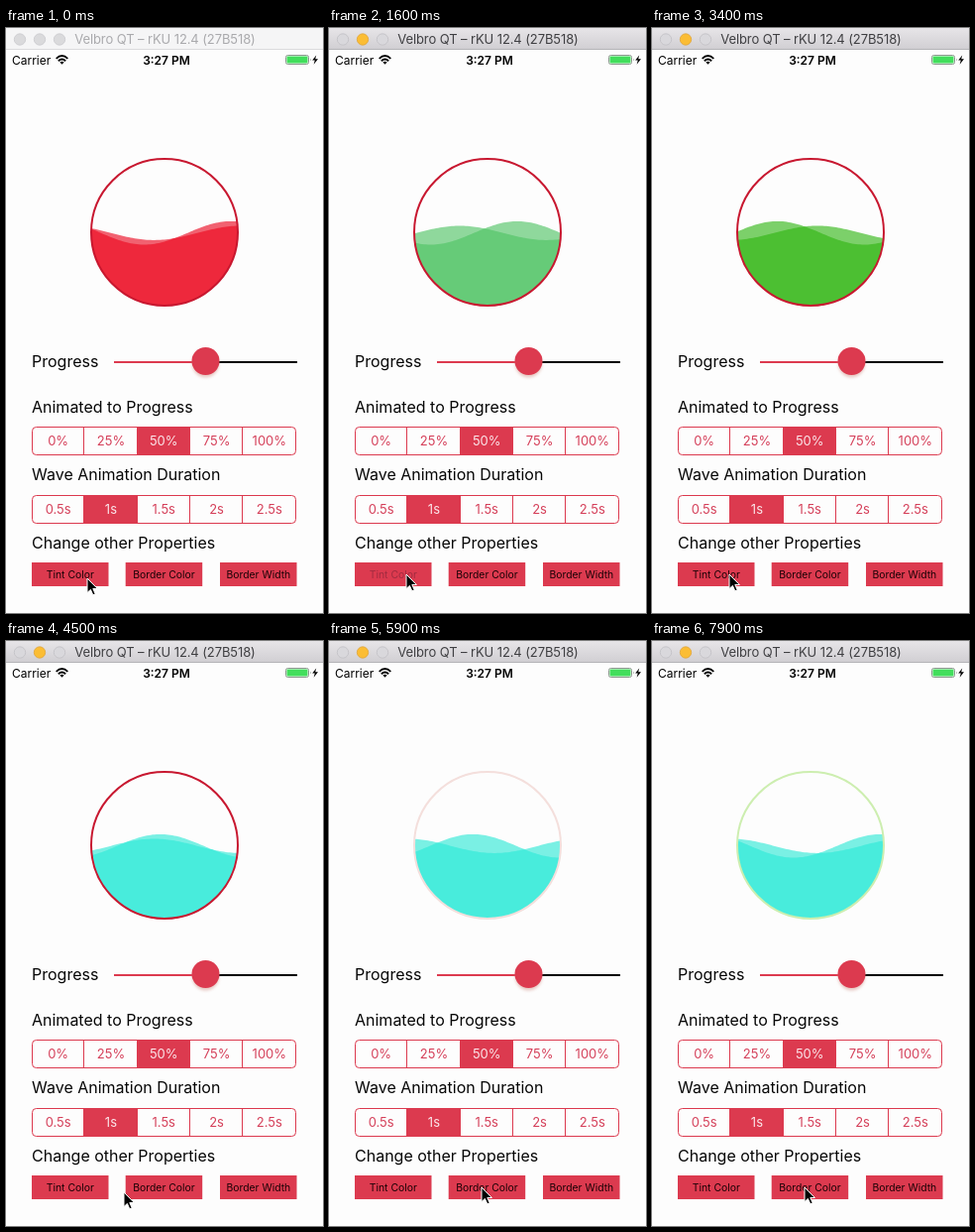
An HTML page that plays this animation: 320x590 px, repeating every 8 s.

```html
<!DOCTYPE html>
<html lang="en">
<head>
<meta charset="utf-8">
<title>Wave progress</title>
<style>
  html, body { margin: 0; width: 100%; height: 100%; overflow: hidden; background: #fdfdfd; }
  svg { display: block; width: 320px; height: 590px; font-family: Inter, Roboto, sans-serif; }
  .mid { text-anchor: middle; }
  .label { font-size: 16px; fill: #060606; }
  .seg { font-size: 13px; fill: #d5405a; }
  .seg.on { fill: #fbe6ea; }
  .btn { font-size: 10.4px; fill: #1c0206; }
  .btn.down { fill: #a22c40; }
  .red { fill: #dc3a4f; }
  .line { fill: none; stroke: #dc3a4f; }
  #title { font-size: 13px; letter-spacing: -.1px; fill: #3f3f42; }
  #bar { fill: url(#chrome); }
  #barEdge { fill: #b4b3b7; }
  .light { fill: #d9d8dc; stroke: #c0bfc4; stroke-width: .8; }
  .light.amber { fill: #fbbd34; stroke: #dfa43a; }
  .idle #bar { fill: #f5f5f6; }
  .idle #barEdge { fill: #dadadc; }
  .idle #title { fill: #aaaaad; }
  .idle .light { fill: #dadadc; stroke: #cacacd; }
</style>
</head>
<body>
<svg id="stage" class="idle" viewBox="0 0 320 590">
  <defs>
    <linearGradient id="chrome" x1="0" y1="0" x2="0" y2="1">
      <stop offset="0" stop-color="#e7e5e8"/>
      <stop offset="1" stop-color="#d0ced2"/>
    </linearGradient>
    <clipPath id="bowl"><circle cx="160" cy="206" r="74"/></clipPath>
    <filter id="soft" x="-50%" y="-50%" width="200%" height="200%">
      <feGaussianBlur stdDeviation="1.8"/>
    </filter>
  </defs>

  <rect width="320" height="590" fill="#fdfdfd"/>
  <rect id="bar" width="320" height="22"/>
  <rect id="barEdge" y="21" width="320" height="1"/>
  <circle class="light" cx="14" cy="11.5" r="5.7"/>
  <circle class="light amber" cx="34" cy="11.5" r="5.7"/>
  <circle class="light" cx="54" cy="11.5" r="5.7"/>
  <text id="title" class="mid" x="160.5" y="16">Velbro QT – rKU 12.4 (27B518)</text>

  <text x="6" y="36.5" font-size="12">Carrier</text>
  <g fill="none" stroke="#000" stroke-width="1.9">
    <path d="M50.7 30.9Q56.5 25.3 62.3 30.9M52.9 33.2Q56.5 29.8 60.1 33.2"/>
    <path d="M54.4 34.6Q56.5 32.8 58.6 34.6L56.5 36.8Z" fill="#000" stroke="none"/>
  </g>
  <text class="mid" x="162" y="36.5" font-size="12" font-weight="600">3:27 PM</text>
  <rect x="282.5" y="27.5" width="23" height="9" rx="2" fill="none" stroke="#8c988e"/>
  <rect x="283.5" y="28.5" width="21" height="7" rx="1" fill="#42de5c"/>
  <path d="M307 30.5q1.6 1.5 0 3z" fill="#8c988e"/>
  <path d="M313.2 27.5l-4 5h2.6l-1.2 4.2 4.4-5.4h-2.8z"/>

  <g clip-path="url(#bowl)">
    <path id="either" fill-opacity=".72"/>
    <path id="both"/>
  </g>
  <circle id="ring" cx="160" cy="206" r="74" fill="none" stroke-width="2"/>

  <text class="label" x="26" y="342">Progress</text>
  <rect class="red" x="109" y="336" width="93" height="2"/>
  <rect x="202" y="336" width="92" height="2"/>
  <circle cx="201.5" cy="339" r="13.5" fill="#d8a49c" opacity=".6" filter="url(#soft)"/>
  <circle class="red" cx="201.5" cy="336" r="14"/>

  <text class="label" x="26" y="388">Animated to Progress</text>
  <text class="label" x="26" y="456">Wave Animation Duration</text>
  <text class="label" x="26" y="525">Change other Properties</text>
  <g id="controls"></g>

  <path id="cursor" d="M0 0V14.5L3.4 11.4L5.8 16.8L8.2 15.8L5.8 10.5H10.4Z"
        stroke="#fff" stroke-width="1" stroke-linejoin="round"/>
</svg>
<script>
const $ = id => document.getElementById(id);
const controls = $('controls');

function add(name, attrs, text = '') {
  const el = document.createElementNS('http://www.w3.org/2000/svg', name);
  for (const key in attrs) el.setAttribute(key, attrs[key]);
  el.textContent = text;
  return controls.appendChild(el);
}

function segments(y, labels, chosen) {
  const w = 266.5 / labels.length;
  const edge = i => Math.floor(26.5 + i * w) - .5;
  add('rect', { class: 'red', x: edge(chosen), y, width: edge(chosen + 1) - edge(chosen), height: 28 });
  add('rect', { class: 'line', x: 26.5, y, width: 266, height: 28, rx: 4 });
  labels.forEach((label, i) => {
    if (i) add('path', { class: 'line', d: `M${edge(i)} ${y}v28` });
    add('text', { class: i === chosen ? 'mid seg on' : 'mid seg', x: 26 + (i + .5) * w, y: y + 18.5 }, label);
  });
}

function button(x, label) {
  add('rect', { class: 'red', x, y: 539, width: 77.5, height: 24 });
  return add('text', { class: 'mid btn', x: x + 38.8, y: 554.5 }, label);
}

segments(402.5, ['0%', '25%', '50%', '75%', '100%'], 2);
segments(471.5, ['0.5s', '1s', '1.5s', '2s', '2.5s'], 1);
const tintBtn = button(26, 'Tint Color');
const borderBtn = button(120.7, 'Border Color');
button(216, 'Border Width');

const LOOP = 8000, STEP = 100, PRESS = 200;
const LEVEL = 206.7, LENGTH = 175;
// crest: x at time zero, rate: wavelengths per second towards the left
const waves = [
  { height: 11.8, crest: 52, rate: .757 },
  { height: 7.2, crest: 62, rate: 1 }
];
const tints = [[0, '#ee283c'], [900, '#66cb78'], [1700, '#4cbf32'], [3700, '#48ecdc']];
const borders = [[0, '#c81830'], [5800, '#f4dfdc'], [7200, '#cdeeb0']];
const pointer = [[0, 82, 555], [300, 82, 555], [600, 78, 551], [4000, 78, 551], [4500, 119, 556], [4900, 154, 551]];

const latest = (list, t) => list.filter(item => item[0] <= t).pop();
const pressed = (list, t) => list.some(([at]) => at > t && at - t <= PRESS);

function surface(wave, x, t) {
  const turn = (x - wave.crest) / LENGTH + wave.rate * t / 1000;
  return LEVEL - wave.height * Math.cos(2 * Math.PI * turn);
}

function water(pick, t) {
  let d = 'M84 282';
  for (let x = 84; x <= 236; x += 2)
    d += `L${x} ${pick(...waves.map(w => surface(w, x, t))).toFixed(2)}`;
  return d + 'V282Z';
}

function pointerAt(t) {
  const from = latest(pointer, t);
  const to = pointer[pointer.indexOf(from) + 1] || from;
  const u = to === from ? 0 : (t - from[0]) / (to[0] - from[0]);
  const ease = u * u * (3 - 2 * u);
  return [1, 2].map(i => from[i] + (to[i] - from[i]) * ease);
}

function draw() {
  const t = Math.floor(performance.now() % LOOP / STEP) * STEP;
  const tint = latest(tints, t)[1];
  $('either').setAttribute('d', water(Math.min, t));
  $('both').setAttribute('d', water(Math.max, t));
  $('either').style.fill = $('both').style.fill = tint;
  $('ring').style.stroke = latest(borders, t)[1];
  $('stage').classList.toggle('idle', t < 600);
  tintBtn.classList.toggle('down', pressed(tints, t));
  borderBtn.classList.toggle('down', pressed(borders, t));
  $('cursor').setAttribute('transform', `translate(${pointerAt(t)})`);
  requestAnimationFrame(draw);
}
draw();
</script>
</body>
</html>
```
